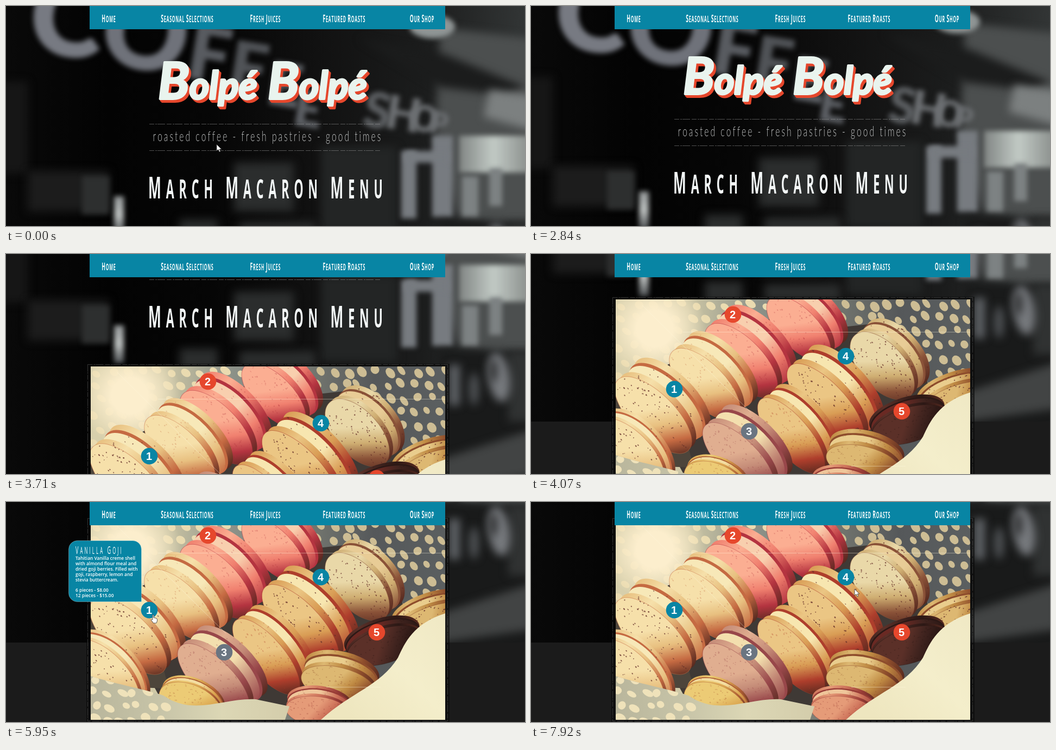
An HTML page with a canvas that plays this animation: 956 by 407 pixels, repeating every 8000 ms.

```html
<!DOCTYPE html>
<html lang="en">
<head>
<meta charset="utf-8">
<title>Macaron menu</title>
<style>
html, body { margin: 0; width: 100%; height: 100%; overflow: hidden; background: #000; }
canvas { display: block; }
</style>
</head>
<body>
<canvas id="stage" width="956" height="407"></canvas>
<script>
const W = 956, H = 407, LOOP = 8000, BASE = 394;
const TEAL = '#0885a4', RED = '#e6472c', GREY = '#6a7581';
const ctx = document.getElementById('stage').getContext('2d');

let seed = 7;
const rand = () => (seed = seed * 16807 % 2147483647) / 2147483647;
const between = (a, b) => a + (b - a) * rand();

function makeCanvas(h) {
  const c = document.createElement('canvas');
  c.width = W;
  c.height = h;
  return c;
}

function gradient(g, x0, y0, x1, y1, colors) {
  const fill = g.createLinearGradient(x0, y0, x1, y1);
  colors.forEach((c, i) => fill.addColorStop(i / (colors.length - 1), c));
  return fill;
}

function glow(g, x, y, r, color, clear) {
  const fill = g.createRadialGradient(x, y, r * .35, x, y, r);
  fill.addColorStop(0, color);
  fill.addColorStop(1, clear);
  g.fillStyle = fill;
  g.fillRect(x - r, y - r, 2 * r, 2 * r);
}

function ellipse(g, x, y, rx, ry, fill, angle = 0) {
  g.beginPath();
  g.ellipse(x, y, rx, ry, angle, 0, 7);
  g.fillStyle = fill;
  g.fill();
}

function polygon(g, points, fill) {
  g.beginPath();
  points.forEach(([x, y]) => g.lineTo(x, y));
  g.closePath();
  g.fillStyle = fill;
  g.fill();
}

// Narrow lettering: one condensed face, optionally with larger initials.
function lettering(g, text, x, y, { size, small = size, gap, narrow = .45, face, color, align = 0 }) {
  const glyphs = [...text].map((ch, i) => {
    const initial = i === 0 || text[i - 1] === ' ';
    const font = `${face.weight} ${initial ? size : small}px ${face.family}`;
    g.font = font;
    return { ch, font, w: g.measureText(ch).width * narrow + gap };
  });
  const width = glyphs.reduce((sum, q) => sum + q.w, -gap);
  x -= width * align;
  g.fillStyle = color;
  for (const q of glyphs) {
    g.save();
    g.translate(x, y);
    g.scale(narrow, 1);
    g.font = q.font;
    g.fillText(q.ch, 0, 0);
    g.restore();
    x += q.w;
  }
}

const CAPS = { weight: 700, family: '"Open Sans", sans-serif' };
const THIN = { weight: 300, family: 'Lato, sans-serif' };

function drawShop(g) {
  g.save();
  g.beginPath();
  g.rect(0, 0, W, 654);
  g.clip();
  g.fillStyle = gradient(g, 0, 0, W, 0, ['#090909', '#030303', '#060606', '#111', '#1b1c1c', '#323535']);
  g.fillRect(0, 0, W, 654);
  g.filter = 'blur(8px)';
  g.fillStyle = '#161616';
  g.fillRect(-10, 140, 50, 170);
  g.fillStyle = '#1c1c1c';
  g.fillRect(40, 305, 150, 75);
  polygon(g, [[800, 40], [970, 60], [970, 410], [830, 390], [790, 250]], '#4c4f4f');
  polygon(g, [[650, 60], [810, 90], [956, 150], [920, 165], [800, 150]], '#1b1c1c');
  polygon(g, [[890, 155], [970, 165], [970, 230], [880, 205]], '#7c8080');
  g.fillStyle = '#232525';
  g.fillRect(580, 260, 140, 160);
  g.fillStyle = '#2b2d2d';
  g.fillRect(420, 290, 110, 90);
  g.fillRect(320, 395, 70, 40);
  g.fillRect(430, 400, 140, 30);

  g.filter = 'blur(5px)';
  g.textAlign = 'center';
  g.textBaseline = 'middle';
  const sign = [['C', 112, 28, 210, '#777a82'], ['O', 256, 58, 196, '#6f727a'], ['F', 374, 96, 140, '#585b60'],
    ['F', 446, 120, 126, '#505357'], ['E', 513, 152, 112, '#5c5f64'], ['E', 556, 196, 92, '#5c5f64'],
    ['S', 684, 198, 92, '#5b5e61'], ['H', 732, 204, 86, '#6c6f72'], ['O', 770, 212, 68, '#6d7073'], ['P', 797, 219, 54, '#6c6f72']];
  for (const [ch, x, y, size, color] of sign) {
    g.save();
    g.translate(x, y);
    g.rotate(.16);
    g.font = `900 ${size}px Lato, sans-serif`;
    g.fillStyle = color;
    g.fillText(ch, 0, 0);
    g.restore();
  }
  g.textAlign = 'left';
  g.textBaseline = 'alphabetic';

  ellipse(g, 785, 38, 42, 22, '#8f9595');
  g.fillStyle = '#777b80';
  g.fillRect(728, 268, 28, 125);
  g.fillRect(785, 240, 38, 150);
  g.fillRect(735, 268, 80, 22);
  g.fillStyle = gradient(g, 840, 0, W, 0, ['#868b89', '#c2cac5', '#909592']);
  g.fillRect(835, 240, 140, 68);
  g.fillStyle = '#7d8283';
  g.fillRect(840, 315, 30, 75);
  g.fillRect(890, 300, 24, 70);
  g.fillStyle = gradient(g, 0, 350, 0, 424, ['#8f9394', '#bcc0bf', '#44474a']);
  g.fillRect(199, 352, 18, 70);
  g.fillStyle = '#2d2f2f';
  g.fillRect(140, 315, 50, 70);

  g.filter = 'blur(8px)';
  g.fillStyle = '#191a1a';
  g.fillRect(800, 400, 180, 270);
  polygon(g, [[800, 600], [970, 545], [970, 630], [800, 654]], '#424444');
  g.fillStyle = '#303232';
  g.fillRect(925, 400, 50, 130);
  g.fillStyle = '#606367';
  g.fillRect(816, 425, 20, 75);
  ellipse(g, 908, 448, 20, 46, '#777a7e', -.15);
  ellipse(g, 898, 436, 7, 22, '#2c2d2e');
  ellipse(g, 862, 470, 9, 30, '#505356');
  g.restore();
}

// A tilted biscuit: far shell, cream and near shell along the local -y axis.
function macaron(g, x, y, L, S, deg, d, tones, speckled) {
  const [light, mid, dark, cream] = tones;
  const shade = '#56291f';
  const shell = gradient(g, -L * .7, -S, L * .75, S * 1.25, [light, light, light, mid, dark, shade]);
  const rear = gradient(g, -L, 0, L, 0, [mid, light, mid, dark, shade]);
  g.save();
  g.translate(x, y);
  g.rotate(deg * Math.PI / 180);
  ellipse(g, 0, -d, L, S, rear);
  ellipse(g, 0, -d * .74, L * .99, S, dark);
  ellipse(g, 0, -d * .62, L * .97, S, gradient(g, -L, 0, L, 0, [cream, cream, cream, mid, dark]));
  ellipse(g, 0, -d * .24, L, S, gradient(g, -L, 0, L, 0, [mid, light, mid, dark, shade]));
  ellipse(g, 0, 0, L, S, shell);
  g.lineWidth = 1;
  g.strokeStyle = dark;
  g.globalAlpha = .5;
  g.stroke();
  for (let i = 0; i < 90; i++) {
    const a = between(0, 6.28), r = Math.sqrt(rand()) * .95;
    const lift = rand() < .3 ? -d : 0;
    g.globalAlpha = speckled ? .75 : .3;
    ellipse(g, Math.cos(a) * r * L, Math.sin(a) * r * S + lift, between(.6, 1.9), between(.6, 1.3), speckled ? '#66302a' : dark);
  }
  g.restore();
}

function polkaDots(g, x0, y0, x1, y1, step, color, angle) {
  for (let y = y0; y < y1; y += step)
    for (let x = x0; x < x1; x += step)
      ellipse(g, x + between(-5, 5) + (y / step % 2) * step / 4, y + between(-5, 5), between(7, 11), between(5, 8), color, angle);
}

function drawPhoto(g) {
  g.save();
  g.beginPath();
  g.rect(156, 34, 653, 369);
  g.clip();
  g.fillStyle = gradient(g, 156, 0, 809, 0, ['#d8d0ac', '#cfc8a6', '#8c9188', '#777a72', '#55585a', '#5b5f60']);
  g.fillRect(156, 34, 653, 369);
  polkaDots(g, 160, 44, 430, 180, 26, '#eadbb0', .6);
  polkaDots(g, 570, 44, 815, 200, 25, '#cdbd94', .9);
  glow(g, 228, 88, 95, 'rgba(252,238,205,1)', 'rgba(252,238,205,0)');
  polygon(g, [[575, 85], [640, 78], [705, 115], [735, 200], [735, 265], [640, 310], [560, 370], [500, 385],
    [280, 355], [250, 300], [240, 160], [440, 70]], '#3f3935');
  polygon(g, [[156, 215], [200, 160], [250, 160], [300, 345], [156, 340]], '#4d453b');

  const pink = ['#fbae92', '#f0806f', '#b43440', '#f8cfae'];
  const vanilla = ['#f6e0aa', '#e8c080', '#c56a42', '#f7e8b8'];
  const gold = ['#ebc684', '#d99d55', '#ae3e2c', '#f7e6b0'];
  const pale = ['#e9d8a8', '#cfae72', '#8a5238', '#e8cc96'];
  const mauve = ['#e0ae90', '#c58c78', '#98474a', '#f3dfae'];
  const cocoa = ['#5b3028', '#41241f', '#2c1815', '#6a2923'];
  const yellow = ['#eccb75', '#dba650', '#ad5d34', '#f3dda1'];
  const tan = ['#ddb872', '#bf8a43', '#8e4d2c', '#e9cd8d'];
  macaron(g, 493, 88, 76, 36, 46, 45, pink);
  macaron(g, 647, 157, 76, 41, 48, 38, pale, true);
  macaron(g, 387, 147, 87, 40, 46, 50, pink);
  macaron(g, 320, 191, 85, 38, 46, 46, vanilla);
  macaron(g, 542, 227, 95, 38, 47, 52, gold, true);
  macaron(g, 790, 222, 75, 30, -18, 26, tan, true);
  macaron(g, 698, 266, 72, 32, -17, 20, cocoa);
  macaron(g, 225, 248, 92, 40, 45, 50, vanilla, true);
  macaron(g, 479, 286, 87, 34, 50, 40, gold);
  macaron(g, 178, 325, 88, 46, 47, 26, vanilla, true);
  macaron(g, 382, 328, 86, 36, 45, 48, mauve);
  macaron(g, 612, 338, 70, 32, 14, 30, tan);
  macaron(g, 575, 388, 60, 28, 8, 20, ['#e59b78', '#cd725a', '#973b36', '#efc69a']);
  macaron(g, 340, 375, 62, 36, 25, 14, yellow);

  g.beginPath();
  g.moveTo(156, 322);
  g.bezierCurveTo(195, 335, 250, 345, 290, 358);
  g.bezierCurveTo(345, 397, 400, 362, 460, 365);
  g.lineTo(522, 378);
  g.lineTo(514, 403);
  g.lineTo(156, 403);
  g.closePath();
  g.fillStyle = gradient(g, 156, 0, 520, 0, ['#b9b69c', '#c6c3a7', '#dcd7b5', '#d4cdab']);
  g.fill();
  g.save();
  g.clip();
  polkaDots(g, 160, 328, 300, 410, 25, '#efe2ba', .5);
  g.restore();

  g.beginPath();
  g.moveTo(809, 206);
  g.bezierCurveTo(750, 225, 735, 260, 722, 288);
  g.bezierCurveTo(690, 340, 635, 352, 580, 403);
  g.lineTo(809, 403);
  g.closePath();
  g.fillStyle = gradient(g, 640, 403, 809, 220, ['#eee6bf', '#f4eecb', '#f0e9c5']);
  g.fill();

  g.strokeStyle = 'rgba(255,250,225,.4)';
  g.lineWidth = 1;
  g.beginPath();
  g.moveTo(280, 94.5);
  g.lineTo(809, 94.5);
  g.moveTo(590, 342.5);
  g.lineTo(690, 342.5);
  g.moveTo(205, 45);
  g.lineTo(405, 243);
  g.stroke();
  g.restore();

  const badges = [[264, 200, TEAL], [372, 62, RED], [402, 278, GREY], [580, 139, TEAL], [683, 241, RED]];
  g.textAlign = 'center';
  badges.forEach(([x, y, color], i) => {
    ellipse(g, x, y, 15.3, 15.3, color);
    g.fillStyle = '#fff';
    g.font = '700 20px "Liberation Sans", Arial, sans-serif';
    g.fillText(i + 1, x - .5, y + 7);
  });
  g.textAlign = 'left';
}

function drawWordmark(g, x, y) {
  const layers = [[4, 5, RED], [2, 2.5, RED], [0, 0, '#e9f4ee']];
  g.lineJoin = 'round';
  g.lineWidth = 4;
  for (const [dx, dy, color] of layers) {
    g.fillStyle = g.strokeStyle = color;
    let pen = x + dx;
    for (const [part, size] of [['B', 94], ['olpé', 70]]) {
      g.font = `italic 700 ${size}px Lato, sans-serif`;
      g.fillText(part, pen, y + dy);
      g.strokeText(part, pen, y + dy);
      pen += g.measureText(part).width;
    }
  }
}

function drawPage() {
  const page = makeCanvas(BASE + H), g = page.getContext('2d');
  g.fillStyle = '#1b1b1b';
  g.fillRect(0, 0, W, BASE + H);
  drawShop(g);

  drawWordmark(g, 280, 172);
  drawWordmark(g, 482, 172);

  g.strokeStyle = 'rgba(170,170,170,.45)';
  g.lineWidth = 1;
  g.setLineDash([9, 2, 3, 1, 14, 3]);
  g.beginPath();
  for (const y of [218.5, 267.5]) {
    g.moveTo(264, y);
    g.lineTo(690, y);
  }
  g.stroke();
  lettering(g, 'roasted coffee - fresh pastries - good times', 480.5, 250,
    { size: 26, gap: 3, narrow: .6, face: THIN, color: '#c4c6c6', align: .5 });
  lettering(g, 'MARCH MACARON MENU', 478, 356,
    { size: 56, small: 48, gap: 8.9, face: CAPS, color: '#f3f7f7', align: .5 });

  g.fillStyle = 'rgba(8,8,8,.6)';
  g.fillRect(148, 423, 669, 380);
  g.strokeStyle = 'rgba(150,150,150,.3)';
  g.strokeRect(150.5, 424.5, 663, 375);
  g.setLineDash([]);
  g.translate(0, BASE);
  drawPhoto(g);
  return page;
}

const NAV = [['HOME', 189], ['SEASONAL SELECTIONS', 333.5], ['FRESH JUICES', 477.5], ['FEATURED ROASTS', 622.5], ['OUR SHOP', 766]];

function drawNav(hover) {
  ctx.fillStyle = TEAL;
  ctx.fillRect(154, 0, 655, 43);
  NAV.forEach(([label, x], i) => lettering(ctx, label, x, 30,
    { size: 19.5, small: 16, gap: .7, face: CAPS, color: i === hover ? '#e8b52c' : '#f4fafa', align: .5 }));
}

const CARDS = {
  1: { x: 115, y: 71, color: TEAL, title: 'VANILLA GOJI', body: ['Tahitian Vanilla creme shell', 'with almond flour meal and', 'dried goji berries. Filled with', 'goji, raspberry, lemon and', 'stevia buttercream.'] },
  2: { x: 388, y: 71, color: RED, title: 'ROSE BERRY', body: ['Strawberry creme shell with', 'almond flour meal and rose', 'petals. Filled with berry,', 'cream, lemon and vanilla', 'buttercream.'] },
  3: { x: 415, y: 151, color: GREY, title: 'PLUM SPICE', body: ['Plum and spice shell with', 'almond flour meal and dried', 'plums. Filled with honey,', 'ginger, lemon and vanilla', 'buttercream.'] },
  5: { x: 699, y: 114, color: RED, title: 'DARK COCOA', body: ['Dark cocoa shell with fine', 'almond flour meal and cocoa', 'nibs. Filled with chocolate,', 'cherry, orange and vanilla', 'ganache.'] }
};

function drawCard(id) {
  const { x, y, color, title, body } = CARDS[id];
  ctx.beginPath();
  ctx.roundRect(x + .5, y + .5, 134, 113, id === 1 ? [16, 16, 0, 16] : [16, 16, 16, 0]);
  ctx.fillStyle = color;
  ctx.fill();
  ctx.lineWidth = 1;
  ctx.strokeStyle = 'rgba(255,255,255,.3)';
  ctx.stroke();
  lettering(ctx, title, x + 13, y + 25, { size: 20, small: 17.5, gap: 3.1, face: { ...CAPS, weight: 400 }, color: '#fff' });
  ctx.font = '600 8.4px "Open Sans", sans-serif';
  [...body, '', '6 pieces - $8.00', '12 pieces - $15.00'].forEach((line, i) => ctx.fillText(line, x + 13, y + 36 + i * 9.9));
}

const ARROW = new Path2D('M0 0V12L3 9.5L5 14L7 13L5 9H9Z');
const HAND = new Path2D('M3 1Q4 0 5 1V6L8 6.5L11 8Q12 9 11.5 12L10 16H4.5L.5 10.5Q0 9 1.5 9L3 10Z');

function drawCursor(x, y, shape) {
  ctx.save();
  ctx.translate(x, y);
  ctx.fillStyle = '#fff';
  ctx.fill(shape);
  ctx.lineWidth = .8;
  ctx.strokeStyle = '#333';
  ctx.stroke(shape);
  ctx.restore();
}

const SCROLL = [[0, 0], [2840, 9], [2960, 48], [3390, 96], [3710, 220], [4070, 344], [4460, 394]];

// time, x, y, pointer shape, hovered menu item, open card
const POINTER = [
  [0, 388, 256, ARROW], [120, 404, 171, ARROW], [570, 325, 28, HAND, 1], [830, 268, 38, ARROW],
  [960, 219, 34, HAND, 0], [1110, 212, 35, HAND, 0], [1260, 228, 35, HAND, 0],
  [1410, 440, 19, HAND, 2], [1570, 452, 22, HAND, 2], [1710, 525, 37, HAND, 2],
  [1860, 744, 30, HAND, 4], [1980, 892, 60, ARROW], [2840],
  [4910, 423, 58, ARROW], [5380, 380, 64, HAND, -1, 2], [5680, 297, 178, ARROW],
  [5830, 267, 208, HAND, -1, 1], [6540, 393, 258, ARROW], [6850, 400, 271, HAND, -1, 3],
  [7000, 401, 272, HAND, -1, 3], [7250, 560, 262, ARROW], [7370, 684, 240, HAND, -1, 5],
  [7520, 686, 243, HAND, -1, 5], [7800, 620, 190, ARROW], [7920, 596, 161, ARROW]
];

const at = (track, t) => track.findLast(step => step[0] <= t);
const page = drawPage();

function render(now) {
  const t = now % LOOP;
  const [, x, y, shape, hover, card] = at(POINTER, t);
  ctx.drawImage(page, 0, -at(SCROLL, t)[1]);
  drawNav(hover);
  if (card) drawCard(card);
  if (shape) drawCursor(x, y, shape);
}

const start = performance.now();
function tick() {
  render(performance.now() - start);
  requestAnimationFrame(tick);
}
tick();
</script>
</body>
</html>
```
